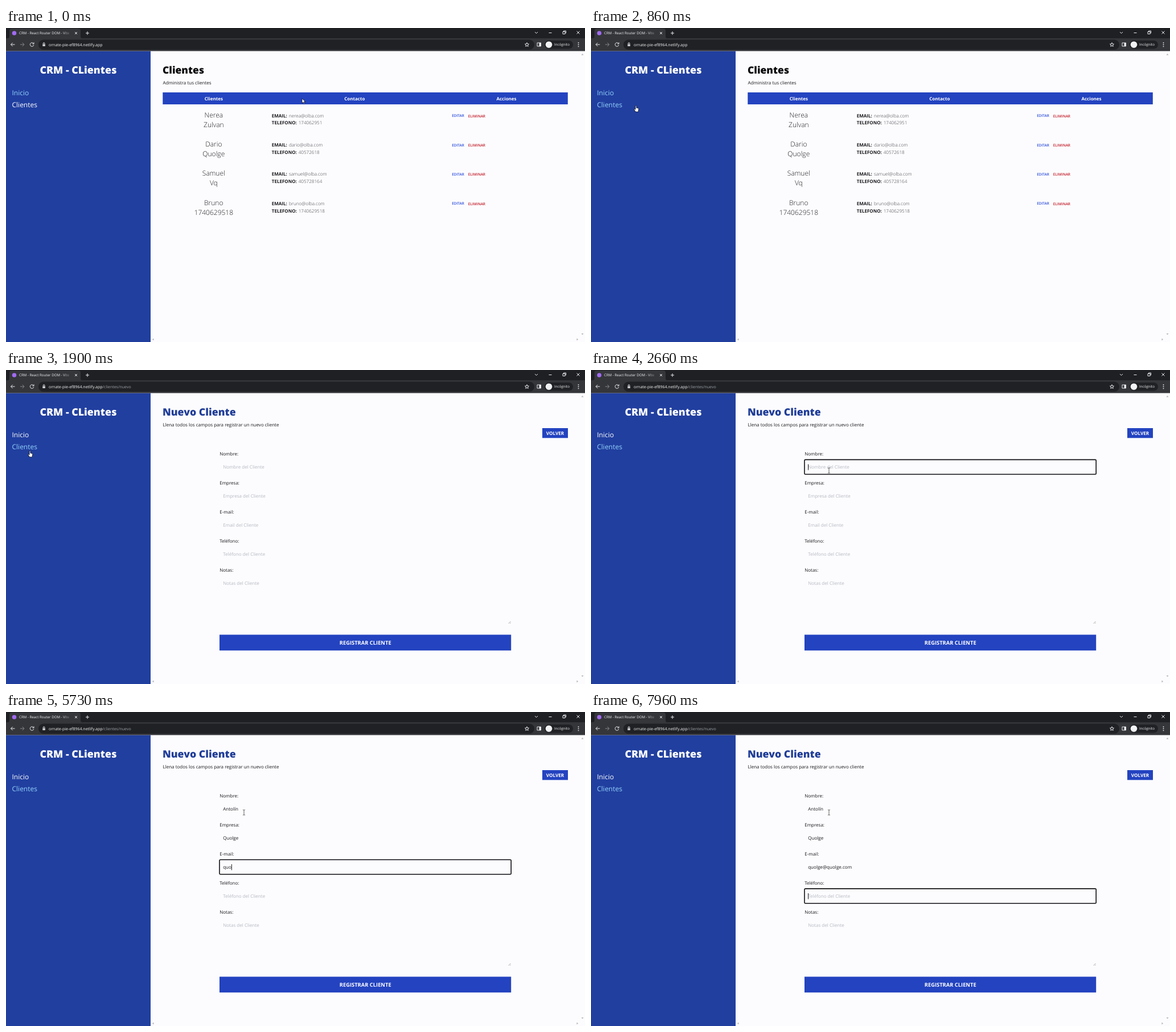
An HTML page that plays this animation: 1017x551 px, repeating every 8 s.

```html
<!DOCTYPE html>
<html lang="es">
<head>
<meta charset="utf-8">
<title>CRM</title>
<style>
  html, body { margin: 0; width: 100%; height: 100%; overflow: hidden; background: #fcfcfe; }
  svg { display: block; width: 100%; height: 100%; }
  text { font-family: "Open Sans", "Noto Sans", sans-serif; text-rendering: geometricPrecision; white-space: pre; }
  .icon { fill: none; stroke: #e8eaed; stroke-width: 1; }
  .scroll { fill: #b4b4b8; }
</style>
</head>
<body>
<svg id="stage" viewBox="0 0 1017 551"></svg>
<script>
const LOOP = 8000;
const BLINK = 530;
const SIDEBAR = '#213f9f', BUTTON = '#2343c0', HEADING = '#203d98';
const LINK = '#93d2fb', INK = '#1c1c20';
const PAGE_SWAP = 1800;

const stage = document.getElementById('stage');
const $ = id => document.getElementById(id);

const text = (x, y, size, str, { fill = INK, weight = 400, anchor = 'start', id = '' } = {}) =>
  `<text x="${x}" y="${y}" font-size="${size}" fill="${fill}" font-weight="${weight}" text-anchor="${anchor}"${id && ` id="${id}"`}>${str}</text>`;
const rect = (x, y, w, h, fill, rx = 0) =>
  `<rect x="${x}" y="${y}" width="${w}" height="${h}" rx="${rx}" fill="${fill}"/>`;
const icon = (d, extra = '') => `<path class="icon" d="${d}" ${extra}/>`;
const white = { fill: '#fff', weight: 700, anchor: 'middle' };

// Browser window
const chrome = () => `
  ${rect(0, 0, 1017, 18, '#1f2023')}
  <path d="M3 18q3 0 3-3V5q0-4 4-4h117q4 0 4 4v10q0 3 3 3z" fill="#35363a"/>
  ${rect(0, 18, 1017, 22.5, '#35363a')}
  <circle cx="14.5" cy="9" r="3.8" fill="#a06bf0"/>
  <linearGradient id="fade" gradientUnits="userSpaceOnUse" x1="100" x2="112" y1="0" y2="0">
    <stop stop-color="#f1f3f4"/><stop offset="1" stop-color="#f1f3f4" stop-opacity=".2"/>
  </linearGradient>
  ${text(23, 11.2, 6.2, 'CRM - React Router DOM - Vite', { fill: 'url(#fade)' })}
  ${icon('M121 7l4 4m0-4l-4 4M140 9h6m-3-3v6')}
  ${icon('M929 7l2.5 2.5L934 7M953.500 8.500h5M1002.500 5.500l5 5m0-5l-5 5')}
  ${icon('M978 6.500h4v4h-4zM979.500 6V5h4v4h-1', 'stroke-width=".8"')}
  ${icon('M15.500 29H8.500m3.200-3.200L8.500 29l3.200 3.200')}
  ${icon('M25 29h7m-3.200-3.200L32 29l-3.200 3.200', 'style="stroke:#85878b"')}
  ${icon('M48.500 27.500a3.300 3.300 0 1 0 .3 2.300M49 25.300v2.600h-2.600')}
  ${rect(57, 20.5, 871, 17.5, '#202124', 8.75)}
  ${rect(64.3, 28.2, 4.6, 3.8, '#c8cacd', .5)}
  ${icon('M65.300 28v-1a1.300 1.300 0 0 1 2.600 0v1', 'stroke-width=".8"')}
  <text x="75" y="31.700" font-size="7" fill="#f1f3f4">ornate-pie-ef8964.netlify.app<tspan id="path" fill="#9aa0a6"></tspan></text>
  ${icon('M915 25.700l1 2.300 2.500.2-1.900 1.600.6 2.500-2.200-1.300-2.200 1.300.6-2.500-1.900-1.600 2.500-.2z', 'stroke-width=".8"')}
  ${icon('M933 26h6.500v6H933z')}${rect(936.5, 26, 3, 6, '#e8eaed')}
  ${rect(946, 22, 50, 14.5, '#202124', 7.25)}
  <circle cx="953.500" cy="29.200" r="5.800" fill="#f1f3f4"/>
  ${text(963, 31.4, 6.2, 'Incógnito', { fill: '#f1f3f4' })}
  ${[26, 29.2, 32.4].map(y => `<circle cx="1005.500" cy="${y}" r=".9" fill="#e8eaed"/>`).join('')}`;

const sidebar = () => `
  ${rect(0, 40.5, 254, 510.5, SIDEBAR)}
  ${text(127, 80.2, 17.8, 'CRM - CLientes', { ...white, weight: 800 })}
  ${text(10.5, 118.2, 12, 'Inicio', { id: 'home' })}
  ${text(10.5, 139.3, 12, 'Clientes', { id: 'clients' })}
  <path class="scroll" d="M1010.500 47.500l2-2.500 2 2.500zM1010.500 536l2 2.500 2-2.500zM259.500 544.500l-2.500 2 2.500 2zM1002.500 544.500l2.500 2-2.500 2z"/>`;

// Client list
const clients = [
  ['Nerea', 'Zulvan', '174062951'],
  ['Dario', 'Quolge', '40572618'],
  ['Samuel', 'Vq', '405728164'],
  ['Bruno', '1740629518', '1740629518'],
];

const clientRow = ([name, company, phone], i) => {
  const y = 156.6 + i * 51.4;
  const big = { weight: 300, anchor: 'middle' };
  const light = { weight: 300, fill: '#3c3c44' };
  return text(364.8, y, 12, name, big) + text(364.8, y + 17, 12, company, big)
    + text(466.8, y, 8, 'EMAIL:', { weight: 700 })
    + text(497, y, 8.1, name.toLowerCase() + '@olba.com', light)
    + text(466.8, y + 12.8, 8, 'TELEFONO:', { weight: 700 })
    + text(513.7, y + 12.8, 8.1, phone, light)
    + text(783.3, y - .5, 6.3, 'EDITAR', { fill: '#2548d8', weight: 600 })
    + text(811.8, y, 6.4, 'ELIMINAR', { fill: '#c01824', weight: 600 });
};

const listPage = () => `<g id="list">
  ${text(275, 80.2, 17.4, 'Clientes', { fill: '#08080a', weight: 800 })}
  ${text(275.5, 99.3, 8.05, 'Administra tus clientes')}
  ${rect(275.3, 113, 711.5, 21, BUTTON)}
  ${text(364.8, 126.6, 8, 'Clientes', white)}
  ${text(612.3, 126.6, 8, 'Contacto', white)}
  ${text(879, 126.6, 8, 'Acciones', white)}
  ${clients.map(clientRow).join('')}</g>`;

// New client form; each field has its focus time and the time of every keystroke
const fields = [
  { label: 'Nombre', hint: 'Nombre', focus: 2530, value: 'Antolín',
    keys: [3260, 3430, 3530, 3660, 3800, 3860, 3960] },
  { label: 'Empresa', hint: 'Empresa', focus: 4100, value: 'Quolge',
    keys: [4500, 4560, 4730, 4800, 4900, 5000] },
  { label: 'E-mail', hint: 'Email', focus: 5160, value: 'quolge@quolge.com',
    keys: [5430, 5560, 5730, 5760, 5900, 5960, 6230, 6530, 6630, 6730, 6860, 7000, 7160, 7330, 7430, 7530, 7600] },
  { label: 'Teléfono', hint: 'Teléfono', focus: 7730, value: '', keys: [] },
  { label: 'Notas', hint: 'Notas', focus: Infinity, value: '', keys: [] },
];
const PITCH = 50.9;
const TEXT_X = 381.2;

const formField = ({ label, hint }, i) => {
  const y = i * PITCH;
  return text(375.2, 149.9 + y, 8, label + ':')
    + text(TEXT_X, 173.3 + y, 8.05, hint + ' del Cliente', { fill: '#b6b9c2', id: 'hint' + i })
    + text(TEXT_X, 173.3 + y, 8.05, '', { id: 'value' + i });
};

const formPage = () => `<g id="form">
  ${text(275, 80.2, 17.7, 'Nuevo Cliente', { fill: HEADING, weight: 800 })}
  ${text(275.5, 99.3, 8.02, 'Llena todos los campos para registrar un nuevo cliente')}
  ${rect(942, 102, 45, 17.3, BUTTON)}
  ${text(964.5, 113.8, 8.2, 'VOLVER', white)}
  ${fields.map(formField).join('')}
  <path d="M882.500 445l4-4M885 445l1.500-1.500" stroke="#8a8a90" stroke-width=".7"/>
  ${rect(375, 464.5, 512.2, 27.7, BUTTON)}
  ${text(631.2, 481.9, 9.35, 'REGISTRAR CLIENTE', white)}
  <g id="focus">
    <rect x="375" y="157.400" width="512.200" height="25.600" rx="1.500" fill="none" stroke="#101014" stroke-width="1.600"/>
    <path id="caret" d="M0 165.300v10.400" stroke="#000" stroke-width=".9"/>
  </g></g>`;

const pointers = `<g id="pointer" stroke="#000" stroke-width=".7" fill="#fff" stroke-linejoin="round">
  <path id="arrow" d="M0 0v8.200l1.900-1.800 1.300 3 1.400-.6-1.300-2.900h2.600z"/>
  <path id="hand" d="M-.9 .6a.9.9 0 0 1 1.800 0v3.200l3 .7q1 .3 .9 1.400l-.7 3.200v1.700h-4.600l-2.700-4q-.3-1 .6-1l1.700 1z"/>
  <path id="beam" d="M-2-4.500h1.500l.5.500.5-.5H2M0-4v8M-2 4.500h1.500L0 4l.5.500H2" fill="none" stroke="#222"/>
</g>`;

stage.innerHTML = rect(0, 0, 1017, 551, '#fcfcfe') + listPage() + formPage() + sidebar() + chrome() + pointers;

// Pointer stops: time, x, y
const stops = [
  [30, 520, 123.7], [850, 79, 136.3], [1600, 42, 142], [1910, 42, 142], [2490, 418, 176.3], [LOOP, 418, 176.3],
];

const pointerAt = t => {
  const n = stops.findIndex(stop => t < stop[0]);
  if (n < 1) return stops[0].slice(1);
  const [t0, x0, y0] = stops[n - 1], [t1, x1, y1] = stops[n];
  const p = (t - t0) / (t1 - t0);
  const e = p * p * (3 - 2 * p);
  return [x0 + (x1 - x0) * e, y0 + (y1 - y0) * e];
};

const show = (id, on) => $(id).setAttribute('display', on ? 'inline' : 'none');
const within = (v, a, b) => v >= a && v <= b;

function drawPointer(t, onForm) {
  const [x, y] = pointerAt(t);
  const onLinks = within(x, 10, 244);
  const overHome = onLinks && within(y, 105, 122);
  const overClients = onLinks && within(y, 127, 144);
  const overInput = onForm && within(x, 375, 887) && within(y, 157, 183);
  $('pointer').setAttribute('transform', `translate(${x} ${y})`);
  show('hand', overHome || overClients);
  show('beam', overInput);
  show('arrow', !overHome && !overClients && !overInput);
  $('home').setAttribute('fill', !onForm || overHome ? LINK : '#fff');
  $('clients').setAttribute('fill', onForm || overClients ? LINK : '#fff');
}

function drawFields(t) {
  let active = -1, lastAction = 0;
  fields.forEach(({ focus, keys, value }, i) => {
    const typed = keys.filter(k => k <= t);
    $('value' + i).textContent = value.slice(0, typed.length);
    show('hint' + i, !typed.length);
    if (focus <= t) {
      active = i;
      lastAction = Math.max(focus, ...typed);
    }
  });
  show('focus', active >= 0);
  if (active < 0) return;
  const filled = $('value' + active).textContent;
  const width = filled ? $('value' + active).getComputedTextLength() : 0;
  $('focus').setAttribute('transform', `translate(0 ${active * PITCH})`);
  $('caret').setAttribute('transform', `translate(${TEXT_X + width + .4} 0)`);
  show('caret', Math.floor((t - lastAction) / BLINK) % 2 === 0);
}

function draw(now) {
  const t = now % LOOP;
  const onForm = t >= PAGE_SWAP;
  show('list', !onForm);
  show('form', onForm);
  $('path').textContent = onForm ? '/clientes/nuevo' : '';
  drawPointer(t, onForm);
  if (onForm) drawFields(t);
}

let start;
function tick(now) {
  start ??= now;
  draw(now - start);
  requestAnimationFrame(tick);
}
draw(0);
requestAnimationFrame(tick);
</script>
</body>
</html>
```
